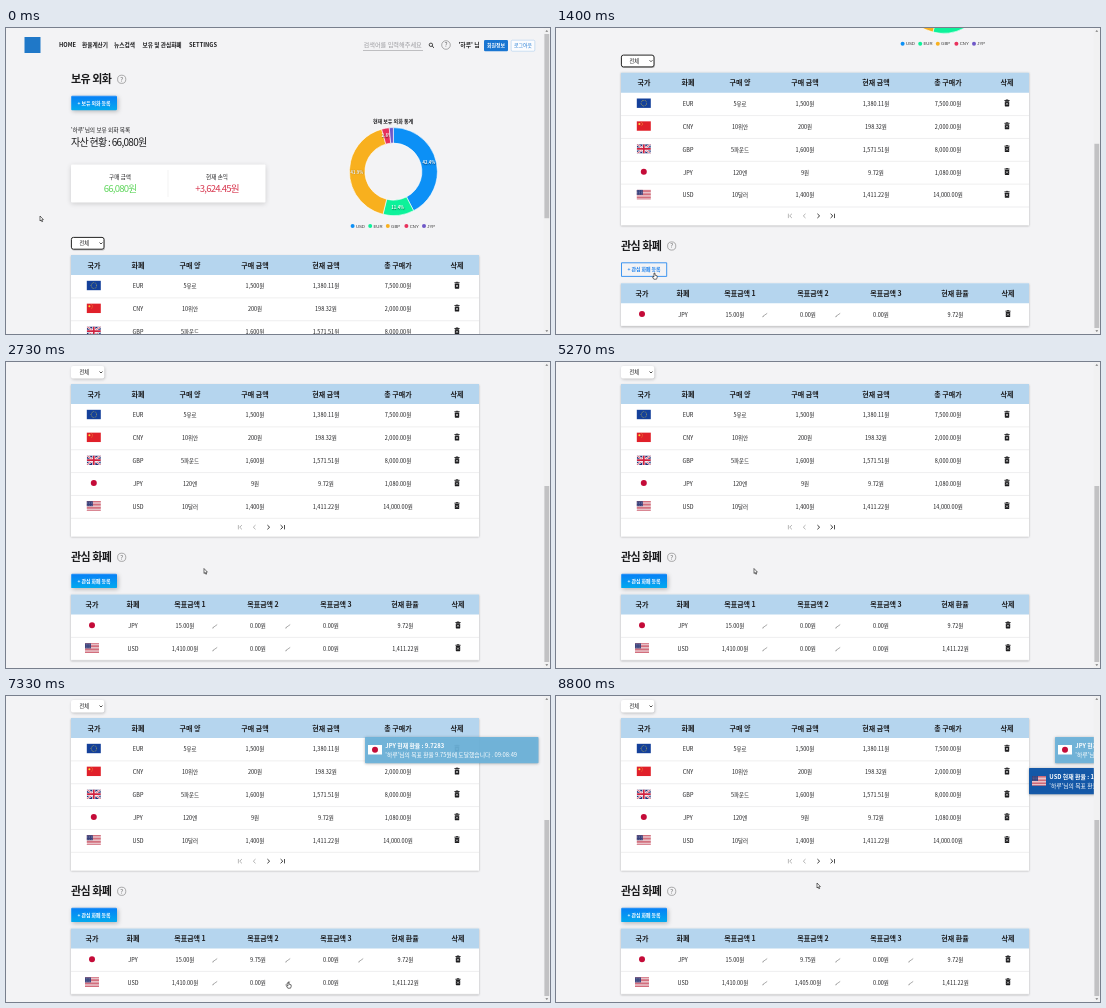
An HTML page with a canvas for the animation above (8870 ms loop, 544 by 306 pixels).

```html
<!DOCTYPE html>
<html lang="ko">
<head>
<meta charset="utf-8">
<style>
html,body{margin:0;width:100%;height:100%;overflow:hidden;background:#f3f3f5}
canvas{display:block;width:544px;height:306px}
</style>
</head>
<body>
<canvas id="stage"></canvas>
<script>
const W = 544, H = 306, LOOP = 8870, STEP = 1000 / 15;
const FONT = '"Noto Sans CJK KR","Noto Sans KR","Noto Sans CJK",sans-serif';
const INK = '#1c1c1e', BLUE = '#1976d2', HEAD = '#b5d5ee', BG = '#f3f3f5', USER = "'하루'";
const cv = document.getElementById('stage');
const dpr = window.devicePixelRatio || 1;
cv.width = W * dpr;
cv.height = H * dpr;
const c = cv.getContext('2d');

const clamp = v => Math.max(0, Math.min(1, v));
const ramp = (t, a, b) => clamp((t - a) / (b - a));
const ease = p => p * p * (3 - 2 * p);
const lerp = (a, b, p) => a + (b - a) * p;

function text(s, x, y, size, o = {}) {
  c.font = `${o.w || 500} ${size}px ${o.font || FONT}`;
  c.letterSpacing = (o.ls || 0) + 'px';
  c.textAlign = o.left ? 'left' : 'center';
  c.fillStyle = o.color || INK;
  c.fillText(s, x, y + size * 0.36);
}
function rect(x, y, w, h, fill, r = 0) {
  c.fillStyle = fill;
  c.beginPath();
  c.roundRect(x, y, w, h, r);
  c.fill();
}
function frame(x, y, w, h, color, lw = 0.6, r = 1.2) {
  c.strokeStyle = color;
  c.lineWidth = lw;
  c.beginPath();
  c.roundRect(x, y, w, h, r);
  c.stroke();
}
function disc(x, y, r, fill) {
  c.fillStyle = fill;
  c.beginPath();
  c.arc(x, y, r, 0, Math.PI * 2);
  c.fill();
}
function line(pts, color, lw) {
  c.strokeStyle = color;
  c.lineWidth = lw;
  c.beginPath();
  pts.forEach(([x, y], i) => i ? c.lineTo(x, y) : c.moveTo(x, y));
  c.stroke();
}
function shadowed(color, blur, dx, dy, draw) {
  c.save();
  c.shadowColor = color;
  c.shadowBlur = blur * dpr;
  c.shadowOffsetX = dx * dpr;
  c.shadowOffsetY = dy * dpr;
  draw();
  c.restore();
}

const flags = {
  EUR(x, y) {
    rect(x, y, 14, 9.4, '#14409a');
    for (let i = 0; i < 12; i++) {
      const a = i * Math.PI / 6;
      disc(x + 7 + 2.8 * Math.cos(a), y + 4.7 + 2.8 * Math.sin(a), 0.42, '#e8cf3a');
    }
  },
  CNY(x, y) {
    rect(x, y, 14, 9.4, '#e0202a');
    disc(x + 2.6, y + 2.6, 1, '#f6dc3c');
    for (let i = 0; i < 4; i++) disc(x + 5 + (i % 3 ? 0.7 : 0), y + 1.1 + i * 1.1, 0.35, '#f6dc3c');
  },
  GBP(x, y) {
    c.save();
    c.beginPath();
    c.rect(x, y, 14, 9.4);
    c.clip();
    rect(x, y, 14, 9.4, '#1c2f75');
    for (const [col, lw] of [['#fff', 2], ['#cf2240', 0.7]]) {
      line([[x, y], [x + 14, y + 9.4]], col, lw);
      line([[x + 14, y], [x, y + 9.4]], col, lw);
    }
    for (const [col, lw] of [['#fff', 3], ['#cf2240', 1.7]]) {
      line([[x + 7, y], [x + 7, y + 9.4]], col, lw);
      line([[x, y + 4.7], [x + 14, y + 4.7]], col, lw);
    }
    c.restore();
  },
  JPY(x, y) {
    rect(x, y, 14, 9.4, '#fff');
    disc(x + 7, y + 4.7, 3, '#c40b38');
  },
  USD(x, y) {
    rect(x, y, 14, 9.4, '#f4eef0');
    for (let i = 0; i < 7; i++) rect(x, y + i * 1.446, 14, 0.72, '#c53c50');
    rect(x, y, 6, 5, '#38407a');
    for (let i = 0; i < 9; i++) disc(x + 1.1 + i % 3 * 1.9, y + 1 + Math.floor(i / 3) * 1.5, 0.28, '#dfe2f2');
  }
};

function help(x, y, r) {
  c.strokeStyle = '#777';
  c.lineWidth = 0.6;
  c.beginPath();
  c.arc(x, y, r, 0, 7);
  c.stroke();
  text('?', x, y, r * 1.5, { color: '#666' });
}
function trash(x, y) {
  rect(x - 2.6, y - 3.2, 5.2, 0.9, INK);
  rect(x - 1.2, y - 3.7, 2.4, 0.8, INK);
  rect(x - 2.2, y - 1.9, 4.4, 5.1, INK, 0.6);
  line([[x - 1, y - 0.5], [x + 1, y + 1.6]], '#fff', 0.6);
  line([[x + 1, y - 0.5], [x - 1, y + 1.6]], '#fff', 0.6);
}
function pencil(x, y) {
  line([[x - 2.3, y + 1.8], [x + 2.2, y - 1.4]], '#a2a2a2', 0.9);
  line([[x - 2.6, y + 2.1], [x - 1.2, y + 1.7]], '#888', 0.6);
}

function addButton(y, label, hover) {
  if (hover) {
    frame(65.5, y + 0.4, 45.2, 13.6, '#2b8cf0', 0.9, 0);
  } else {
    const g = c.createLinearGradient(0, y, 0, y + 14.4);
    g.addColorStop(0, '#087ff6');
    g.addColorStop(1, '#03aaee');
    shadowed('rgba(0,0,0,.25)', 4, 1.3, 1.3, () => rect(65, y, 46, 14.4, g, 1.2));
    line([[65.4, y + 14], [65.4, y + 0.4], [110.6, y + 0.4]], 'rgba(255,255,255,.35)', 0.6);
  }
  text(label, 88, y + 7.3, 4.9, { w: 700, color: hover ? '#1b80ee' : '#fff' });
}

function header() {
  rect(18.5, 9, 16, 16, '#1f78c8');
  const nav = [['HOME', 61.5], ['환율계산기', 89], ['뉴스검색', 118.5], ['보유 및 관심화폐', 156], ['SETTINGS', 197]];
  for (const [s, x] of nav) text(s, x, 17.3, 5.7, { w: 700 });
  text('검색어를 입력해주세요', 357.5, 17, 6.2, { left: 1, w: 400, color: '#9b9b9f' });
  line([[357, 22.5], [417, 22.5]], '#9a9a9e', 0.6);
  c.strokeStyle = '#333';
  c.lineWidth = 0.9;
  c.beginPath();
  c.arc(424.9, 16.8, 1.7, 0, 7);
  c.stroke();
  line([[426.2, 18.1], [428, 19.8]], '#333', 1);
  help(440, 17, 4.3);
  text(USER + ' 님', 463, 16.8, 5.8, { w: 700 });
  rect(478, 12, 24, 11.3, BLUE, 1.2);
  text('회원정보', 490, 17.6, 4.9, { w: 700, color: '#fff' });
  rect(505, 12, 24, 11.3, '#fbfcfe', 1.2);
  frame(505.2, 12.2, 23.6, 11, '#9dc3e8', 0.5);
  text('로그아웃', 517, 17.6, 4.9, { color: BLUE });
}

const slices = [
  ['USD', 42.4, '#0c90f6', 346.6], ['EUR', 11.4, '#0df29a', 364.2], ['GBP', 41.9, '#f8b01e', 381.8],
  ['CNY', 2.8, '#e8315c', 400.4], ['JYP', 1.5, '#6f58c8', 418]
];
function donut() {
  const x = 387.4, y = 143.6;
  text('현재 보유 외화 통계', 387, 93.3, 5, { w: 700 });
  let a = -Math.PI / 2;
  for (const [name, pct, col, lx] of slices) {
    const b = a + pct / 50 * Math.PI;
    c.beginPath();
    c.arc(x, y, 44, a, b);
    c.arc(x, y, 28.5, b, a, true);
    c.closePath();
    c.fillStyle = col;
    c.fill();
    c.strokeStyle = '#fff';
    c.lineWidth = 0.6;
    c.stroke();
    if (pct > 2) {
      const m = (a + b) / 2;
      shadowed('rgba(0,0,0,.5)', 1, 0.3, 0.3, () =>
        text(pct + '%', x + 36.5 * Math.cos(m), y + 36.5 * Math.sin(m), 4.2, { w: 700, color: '#fff' }));
    }
    a = b;
    disc(lx, 198, 2, col);
    text(name, lx + 3.3, 198, 4.3, { left: 1, w: 400, color: '#333', font: '"Liberation Sans",Arial,sans-serif' });
  }
}

function summary() {
  text('보유 외화', 65, 51, 11, { left: 1, w: 700, ls: -0.5 });
  help(115.7, 51.3, 4.1);
  addButton(67.8, '+ 보유 외화 등록', false);
  text(USER + '님의 보유 외화 목록', 65, 102, 5.7, { left: 1 });
  text('자산 현황 : 66,080원', 65, 114, 10, { left: 1, ls: -0.7 });
  shadowed('rgba(0,0,0,.16)', 5, 0, 1.2, () => rect(65, 136.5, 194.5, 38, '#fff', 1));
  line([[162, 142], [162, 169]], '#e4e4e6', 0.5);
  text('구매 금액', 114, 149, 5.6);
  text('현재 손익', 211, 149, 5.6);
  text('66,080원', 114, 161, 9.6, { color: '#5fd65c', ls: -0.8 });
  text('+3,624.45원', 211, 161, 9.6, { color: '#d83a52', ls: -0.8 });
}

function tableHead(y, xs, names) {
  rect(65, y, 408, 20, HEAD);
  names.forEach((s, i) => text(s, xs[i], y + 10, 7, { w: 700 }));
}

const holdX = [88, 132, 184, 249, 320, 392, 451];
const holdings = [
  ['EUR', '5유로', '1,500원', '1,380.11원', '7,500.00원'],
  ['CNY', '10위안', '200원', '198.32원', '2,000.00원'],
  ['GBP', '5파운드', '1,600원', '1,571.51원', '8,000.00원'],
  ['JPY', '120엔', '9원', '9.72원', '1,080.00원'],
  ['USD', '10달러', '1,400원', '1,411.22원', '14,000.00원']
];
function holdTable(focus) {
  shadowed('rgba(0,0,0,.22)', focus ? 0 : 3, 0.6, 1, () => rect(65, 209, 33.3, 12.4, '#fff', 2));
  if (focus) frame(65.4, 209.4, 32.6, 11.8, '#222', 1, 2);
  text('전체', 78.3, 215.2, 5.2);
  line([[93.5, 214.5], [95, 216], [96.5, 214.5]], '#222', 0.8);

  shadowed('rgba(0,0,0,.3)', 2, 0, 0.7, () => rect(65, 227, 408, 152.8, '#fff'));
  tableHead(227, holdX, ['국가', '화폐', '구매 양', '구매 금액', '현재 금액', '총 구매가', '삭제']);
  holdings.forEach((r, i) => {
    const y = 258.3 + i * 22.85;
    flags[r[0]](80.8, y - 5.5);
    r.forEach((s, k) => text(s, holdX[k + 1], y, 5.5));
    trash(451, y - 0.8);
    line([[65, y + 11.6], [473, y + 11.6]], '#e2e2e4', 0.6);
  });
  const y = 370.2;
  const arrow = (x, d, col) => line([[x - d, y - 2.1], [x + d, y], [x - d, y + 2.1]], col, 0.9);
  arrow(234.8, -1.1, '#aaa');
  line([[232.4, y - 2.2], [232.4, y + 2.2]], '#aaa', 0.8);
  arrow(248.4, -1.1, '#aaa');
  arrow(262.5, 1.1, '#222');
  arrow(275.7, 1.1, '#222');
  line([[278.5, y - 2.2], [278.5, y + 2.2]], '#222', 0.8);
}

const watchX = [86, 127, 184, 257, 330, 399, 452];
function watchTable(rows, hover) {
  text('관심 화폐', 65, 400, 11, { left: 1, w: 700, ls: -0.5 });
  help(115.7, 400.3, 4.1);
  addButton(416.7, '+ 관심 화폐 등록', hover);
  shadowed('rgba(0,0,0,.3)', 2, 0, 0.7, () => rect(65, 437.6, 408, 20 + rows.length * 22.8, '#fff'));
  tableHead(437.6, watchX, ['국가', '화폐', '목표금액 1', '목표금액 2', '목표금액 3', '현재 환율', '삭제']);
  rows.forEach(([code, goals, rate], i) => {
    const y = 469 + i * 22.8;
    flags[code](79, y - 5.4);
    text(code, 127, y, 5.5);
    goals.forEach((g, k) => {
      text(g + '원', 179 + k * 73, y, 5.5);
      if (!k || goals[k - 1] !== '0.00') pencil(209 + k * 73, y);
    });
    text(rate, 399.5, y, 5.5);
    trash(452, y - 0.8);
    line([[65, y + 11.4], [473, y + 11.4]], '#e2e2e4', 0.6);
  });
}

function scrollbar(s, full) {
  rect(537.6, 0, 6.4, H, '#f1f1f2');
  rect(538.4, 6 + 294 * s / full, 4.8, 294 * H / full, '#c1c1c3');
  for (const [y, d] of [[3, -1], [303, 1]]) {
    c.fillStyle = '#777';
    c.beginPath();
    c.moveTo(539.4, y - d * 0.7);
    c.lineTo(542.2, y - d * 0.7);
    c.lineTo(540.8, y + d);
    c.fill();
  }
}

// open, close, title, currency, currency shown at, amount, typing from, typing to
const modals = [
  [1470, 2340, '관심 화폐 등록', 'USD', 1800, '1410', 1930, 2190],
  [6130, 6960, '목표금액 수정', 'JPY', 6130, '9.75', 6380, 6680],
  [7410, 8130, '목표금액 수정', 'USD', 7410, '1405', 7600, 7870]
];
function modal(t, [open, close, title, code, pick, amount, from, to]) {
  const p = Math.min(ramp(t, open, open + 100), 1 - ramp(t, close, close + 80));
  if (p <= 0) return;
  c.save();
  c.globalAlpha = p;
  rect(0, 0, W, H, 'rgba(0,0,0,.5)');
  shadowed('rgba(0,0,0,.4)', 9, 0, 3, () => rect(190, 96, 164, 114.5, '#fff', 1));
  text(title, 207, 118, 8.4, { left: 1, w: 700 });
  frame(207.3, 129.3, 129.4, 20, '#cfcfd2');
  rect(210.5, 128, 10.5, 3, '#fff');
  text('화폐', 212, 129, 4.2, { left: 1, w: 400, color: '#666' });
  if (t >= pick) text(code, 212, 139.3, 6, { left: 1, w: 400 });
  c.fillStyle = '#666';
  c.beginPath();
  c.moveTo(328.4, 138.6);
  c.lineTo(331.6, 138.6);
  c.lineTo(330, 140.3);
  c.fill();
  const active = t >= from - 60;
  frame(207.4, 158.2, 129.2, 19.4, active ? '#1b70b8' : '#cfcfd2', active ? 1 : 0.6);
  text(amount.slice(0, Math.floor(ramp(t, from, to) * amount.length)), 212, 168, 6, { left: 1, w: 400 });
  shadowed('rgba(0,0,0,.35)', 2, 0, 0.8, () => rect(248, 186.3, 22.6, 13, '#1563b8', 1.2));
  text('등록', 259.2, 192.8, 4.9, { w: 700, color: '#fff' });
  frame(273.3, 186.6, 22.4, 12.6, '#a9cbec', 0.6);
  text('취소', 284.5, 192.8, 4.9, { color: BLUE });
  c.restore();
}

function toast(x, y, code, fill, l1, l2) {
  if (x >= 538) return;
  c.save();
  c.beginPath();
  c.rect(0, 0, 537.8, H);
  c.clip();
  shadowed('rgba(0,0,0,.3)', 3, 0, 0.5, () => rect(x, y, 173.5, 26.3, fill, 0.8));
  flags[code](x + 3, y + 8);
  text(l1, x + 20.3, y + 9, 5.9, { left: 1, w: 700, color: '#fff' });
  text(l2, x + 20.3, y + 17.6, 5.8, { left: 1, w: 400, color: '#fff' });
  c.restore();
}
function toasts(t) {
  const jpy = x => toast(x, 41, 'JPY', 'rgba(108,179,219,.93)', 'JPY 현재 환율 : 9.7283',
    USER + '님의 목표 환율 9.75원에 도달했습니다 . 09:08:49');
  if (t > 7130 && t < 7900) jpy(lerp(538, 359, ease(ramp(t, 7130, 7300))));
  if (t > 8700) {
    const p = ramp(t, 8733, 8800);
    jpy(lerp(538, 499, p));
    toast(lerp(538, 473, p), 72, 'USD', 'rgba(16,86,168,.97)', 'USD 현재 환율 : 1411.22',
      USER + '님의 목표 환율 1405원에 도달했습니다 . 09:09:02');
  }
}

const path = [
  [130, 34, 188], [400, 42, 182], [950, 50, 190], [1330, 98.5, 245], [1480, 98.5, 245], [1680, 262, 138],
  [1800, 262, 139], [1920, 250, 168], [2130, 250, 168], [2260, 257, 192], [2350, 257, 192], [2620, 198, 206.5],
  [5870, 198, 206.5], [6060, 282, 263], [6160, 282, 263], [6330, 250, 168], [6690, 250, 168], [6860, 260, 192],
  [6960, 260, 192], [7270, 282.5, 286], [7420, 282.5, 286], [7550, 250, 168], [7880, 250, 168],
  [8030, 260.5, 190], [8130, 260.5, 190], [8200, 261, 187]
];
const handTimes = [[1270, 1530], [2200, 2340], [6030, 6190], [6800, 6960], [7240, 7470], [8000, 8130]];
function cursor(t) {
  let i = path.findIndex(k => k[0] > t);
  if (i < 0) i = path.length;
  const a = path[Math.max(0, i - 1)], b = path[Math.min(i, path.length - 1)];
  const p = a === b ? 0 : ease(ramp(t, a[0], b[0]));
  c.save();
  c.translate(lerp(a[1], b[1], p), lerp(a[2], b[2], p));
  c.fillStyle = '#fff';
  c.strokeStyle = '#111';
  c.lineWidth = 0.6;
  c.lineJoin = 'round';
  const hand = handTimes.some(([s, e]) => t >= s && t < e);
  const shape = hand
    ? [[-0.5, 0], [0.4, 0], [0.6, 2.2], [2.6, 2.8], [2.7, 4.4], [2, 6.2], [-0.7, 6.2], [-2.2, 3.8], [-1.7, 3.3], [-0.6, 4]]
    : [[0, 0], [0, 5], [1.1, 4], [1.9, 5.8], [2.6, 5.5], [1.9, 3.7], [3.4, 3.6]];
  c.beginPath();
  shape.forEach(([x, y]) => c.lineTo(x, y));
  c.closePath();
  c.fill();
  c.stroke();
  c.restore();
}

function draw(t) {
  c.setTransform(dpr, 0, 0, dpr, 0, 0);
  rect(0, 0, W, H, BG);
  const added = t >= 2400;
  const s = 182.3 * ease(ramp(t, 260, 1000)) + 22.7 * ease(ramp(t, 2430, 2670));
  const rows = [['JPY', ['15.00', t >= 6990 ? '9.75' : '0.00', '0.00'], '9.72원']];
  if (added) rows.push(['USD', ['1,410.00', t >= 8660 ? '1,405.00' : '0.00', '0.00'], '1,411.22원']);

  c.save();
  c.translate(0, -s);
  header();
  summary();
  donut();
  holdTable(t < 1480);
  watchTable(rows, t >= 1270 && t < 1530);
  c.restore();

  if (!modals.some(m => t >= m[0] && t < m[1])) scrollbar(s, added ? 511 : 488.3);
  modals.forEach(m => modal(t, m));
  toasts(t);
  cursor(t);
}

const start = performance.now();
function tick() {
  const t = (performance.now() - start) % LOOP;
  draw(Math.floor((t + 4) / STEP) * STEP);
  requestAnimationFrame(tick);
}
tick();
</script>
</body>
</html>
```
